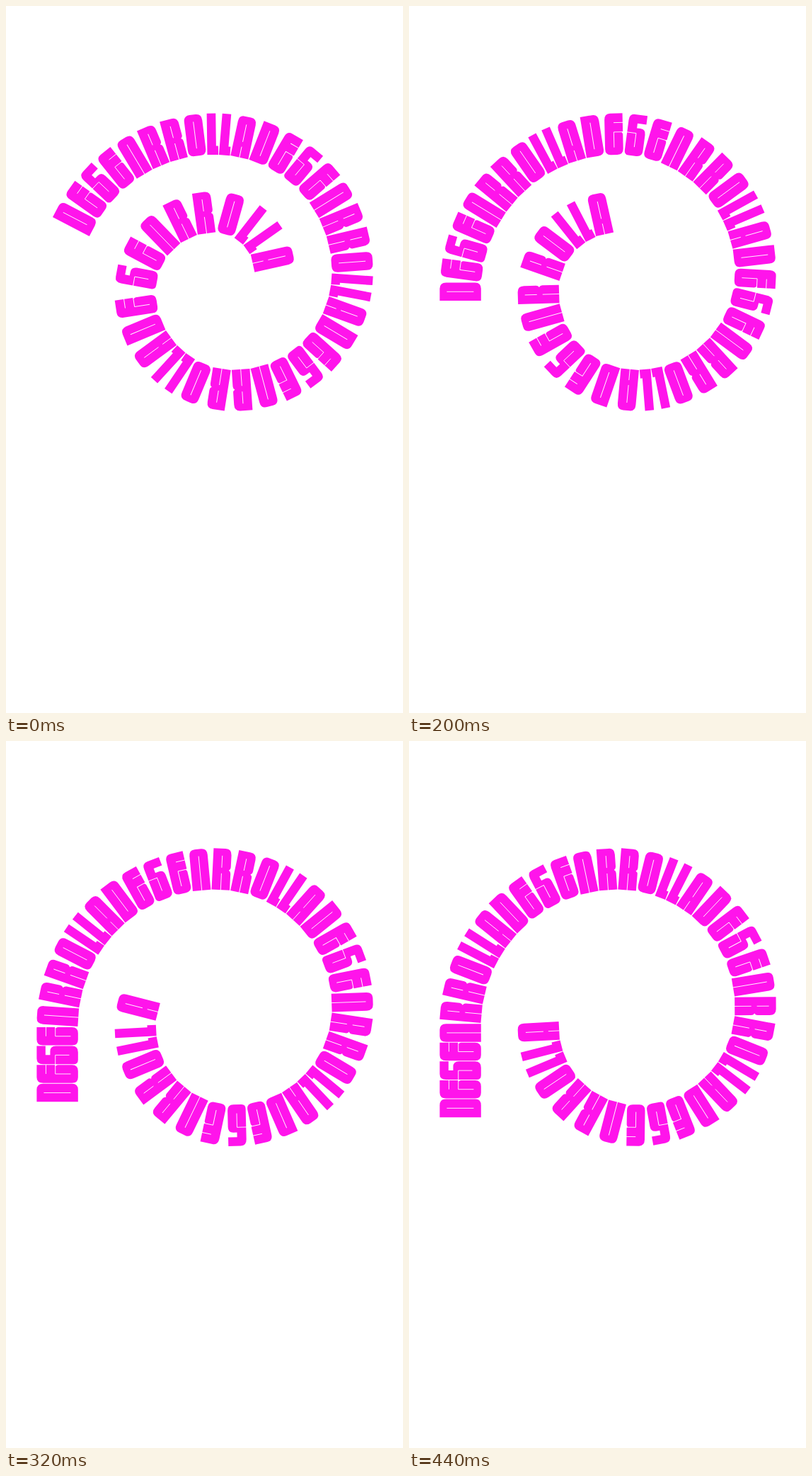
Write an HTML page that moves like this. It is 561 px wide and 998 px high and loops after 0.48 s.

```html
<!DOCTYPE html>
<html lang="es">
<head>
<meta charset="utf-8">
<title>Desenrrolla</title>
<style>
html, body { margin: 0; width: 100%; height: 100%; overflow: hidden; background: #fff; }
svg { display: block; width: 561px; height: 998px; fill: #ff14eb; }
.slit { fill: none; stroke: #fff; stroke-width: .9; }
</style>
</head>
<body>
<svg id="stage" viewBox="0 0 561 998" role="img" aria-label="DESENRROLLA DESENRROLLA DESENRROLLA DESENRROLLA"></svg>
<script>
const NS = 'http://www.w3.org/2000/svg';
const stage = document.getElementById('stage');
const WORD = 'DESENRROLLA', REPEATS = 4;
const HEIGHT = 58.4, WIDE = 26.6, NARROW = 16.4, BEARING = 0.5;

// Each letter is a heavy body cut by hairline slits; y runs from cap height (0) to the baseline.
const GLYPHS = {
  D: ['M0 0H17Q25.6 0 25.6 9V50Q25.6 58.4 17 58.4H0Z', 'M12.8 10V48'],
  E: ['M8 0H25.6V25.5L24 27Q25.6 28 25.6 30V50Q25.6 58.4 17 58.4H8Q0 58.4 0 50V9Q0 0 8 0Z',
      'M12.8 13H26M26 26.3H12.8V48'],
  S: ['M8 0H25.6V12.4H13V19H18Q25.6 19 25.6 27V50Q25.6 58.4 17 58.4H6Q0 58.4 0 52V9Q0 0 8 0Z',
      'M-1 26.3H12.8V46'],
  N: ['M8 0H17Q25.6 0 25.6 9V58.4H0V9Q0 0 8 0Z', 'M12.8 10V59'],
  R: ['M0 0H17Q25.6 0 25.6 9V26Q25.6 29 23 30.5Q25.6 32 25.6 35V58.4H0Z', 'M12.8 10V27M12.8 35V59'],
  O: ['M8.5 0H17Q25.6 0 25.6 9V49.4Q25.6 58.4 17 58.4H8.5Q0 58.4 0 49.4V9Q0 0 8.5 0Z', 'M12.8 10V48'],
  L: ['M0 0H12.6V46H15.6V58.4H0Z', ''],
  A: ['M8 0H17Q25.6 0 25.6 9V58.4H0V9Q0 0 8 0Z', 'M12.8 11V36M12.8 43V59']
};

function add(parent, tag, attrs) {
  const el = document.createElementNS(NS, tag);
  for (const key in attrs) el.setAttribute(key, attrs[key]);
  return parent.appendChild(el);
}

let pen = 0;
const letters = [...WORD.repeat(REPEATS)].map(ch => {
  const advance = ch === 'L' ? NARROW : WIDE;
  const el = add(stage, 'g', {});
  const [body, slit] = GLYPHS[ch];
  add(el, 'path', { d: body });
  if (slit) add(el, 'path', { d: slit, class: 'slit' });
  const letter = { el, mid: pen + advance / 2, shift: BEARING - advance / 2 };
  pen += advance;
  return letter;
});

// Spiral of quarter circles whose centres step round a small square.
const STEP = 27.57, CX = 294.8, CY = 375.4;
const CENTRES = [[0, 1], [0, 0], [1, 0], [1, 1]];
const ARCS = 6;
const INNER = (7 + 6 + 5 + 4) * STEP * Math.PI / 2;

// The text breaks apart where the inner turn begins, then closes up again.
const spread = s => s < INNER ? s : s + 2 + 4 * Math.exp((INNER - s) / 50);

function pointAt(s) {
  if (s < 0) return [CX - 7 * STEP, CY + STEP - s, -90];
  for (let i = 0; ; i++) {
    const r = (7 - i) * STEP, length = r * Math.PI / 2;
    if (s <= length || i === ARCS - 1) {
      const [ox, oy] = CENTRES[i % 4];
      const turn = (i - 1) * Math.PI / 2 + s / r;
      return [
        CX + ox * STEP + r * Math.sin(turn),
        CY + oy * STEP - r * Math.cos(turn),
        turn * 180 / Math.PI
      ];
    }
    s -= length;
  }
}

// Eased travel along the spiral, one knot every 80 ms.
const LOOP = 480, TICK = 40, KNOT = 80, START = 79.5;
const TRAVEL = [0, 8.6, 49.8, 137.4, 186.4, 205, 209];
const knot = i => TRAVEL[Math.max(0, Math.min(TRAVEL.length - 1, i))];

function travel(t) {
  const i = Math.floor(t / KNOT), u = t / KNOT - i;
  const a = knot(i - 1), b = knot(i), c = knot(i + 1), d = knot(i + 2);
  return b + u / 2 * (c - a + u * (2 * a - 5 * b + 4 * c - d + u * (3 * (b - c) + d - a)));
}

function draw(t) {
  const offset = START - travel(t);
  for (const { el, mid, shift } of letters) {
    const [x, y, angle] = pointAt(spread(offset + mid));
    el.setAttribute('transform',
      `translate(${x.toFixed(2)} ${y.toFixed(2)}) rotate(${angle.toFixed(2)}) translate(${shift} ${-HEIGHT})`);
  }
}

const origin = performance.now();
let shown = -1;
function tick() {
  const t = Math.floor((performance.now() - origin) % LOOP / TICK) * TICK;
  if (t !== shown) draw(shown = t);
  requestAnimationFrame(tick);
}
tick();
</script>
</body>
</html>
```
